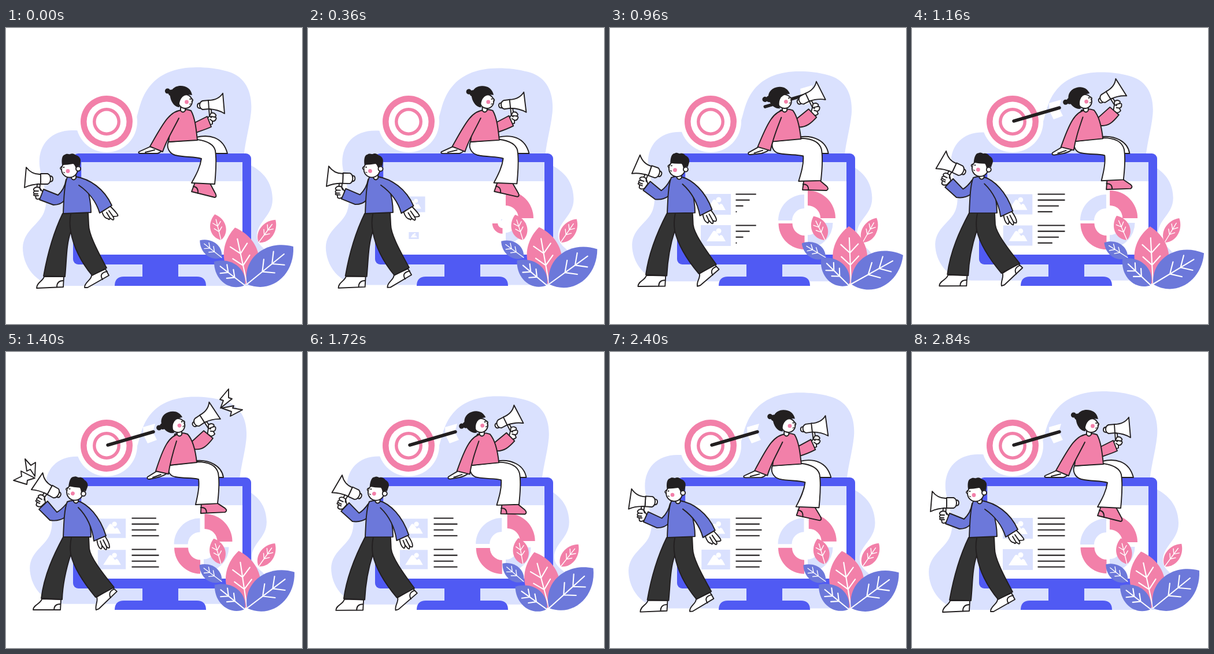
An HTML page for the animation above (2.88 s loop, 512 by 512 pixels).

```html
<!DOCTYPE html>
<html lang="en">
<head>
<meta charset="utf-8">
<title>Marketing team</title>
<style>
  html, body { margin: 0; width: 100%; height: 100%; overflow: hidden; background: #fff; }
  svg { display: block; width: 100vw; height: 100vh; }
  .ink { stroke: #221f20; stroke-width: 1.9; stroke-linejoin: round; stroke-linecap: round; }
  .vein { fill: none; stroke: #fff; stroke-linecap: round; }
</style>
</head>
<body>
<svg id="stage" viewBox="0 0 512 512"></svg>
<script>
const LOOP = 2880;
const PALE = '#dae1fe', PINK = '#f280a9', BLUE = '#505af3', SOFT = '#6c78da', INK = '#221f20', WHITE = '#fff';
const stage = document.getElementById('stage');

function add(tag, attrs, parent = stage) {
  const el = document.createElementNS('http://www.w3.org/2000/svg', tag);
  for (const k in attrs) el.setAttribute(k, attrs[k]);
  parent.appendChild(el);
  return el;
}
const group = (parent) => add('g', {}, parent);
const path = (d, fill, parent) => add('path', { d, fill }, parent);
const line = (d, fill, parent) => add('path', { d, fill, class: 'ink' }, parent);
const dot = (cx, cy, r, fill, parent) => add('circle', { cx, cy, r, fill }, parent);
const box = (x, y, width, height, fill, rx = 0, parent) => add('rect', { x, y, width, height, fill, rx }, parent);
const move = (el, value) => el.setAttribute('transform', value);
const grow = (x, y, s) => `translate(${x} ${y}) scale(${s}) translate(${-x} ${-y})`;

// Eased value through [time, value] points.
function key(t, pts) {
  if (t <= pts[0][0]) return pts[0][1];
  for (let i = 1; i < pts.length; i++) {
    const [t0, a] = pts[i - 1], [t1, b] = pts[i];
    if (t < t1) return a + (b - a) * (1 - Math.cos(Math.PI * (t - t0) / (t1 - t0))) / 2;
  }
  return pts[pts.length - 1][1];
}

// Outlined shape blending between two poses; `drive` names the motion it follows.
const morphs = [];
function morph(drive, fill, from, to, parent) {
  const end = to.match(/-?[\d.]+/g).map(Number);
  const el = line(from, fill, parent);
  morphs.push((pose) => {
    let i = 0;
    el.setAttribute('d', from.replace(/-?[\d.]+/g, (n) => (+n + (end[i++] - n) * pose[drive]).toFixed(2)));
  });
}

// Backdrop
const blob = path('M330 68 C275 68 248 93 236 122 C224 150 226 190 190 186 C155 182 140 177 115 177 ' +
  'C75 177 55 205 58 238 C61 265 76 290 66 318 C58 340 30 350 29 380 C29 410 50 446 95 446 L430 446 ' +
  'C450 440 468 420 463 402 C457 384 434 380 434 360 C434 335 462 325 461 295 C460 262 440 243 411 232 ' +
  'C411 205 421 175 424 145 C427 108 412 82 381 74.5 C365 70 347 68 330 68 Z', PALE);

[[53, WHITE], [45, PINK], [34.5, WHITE], [24, PINK], [18.5, WHITE]].forEach(([r, c]) => dot(174, 162, r, c));

const arrow = group();
path('M237 130 L258 124 L254 138 L261 152 L245 158 L238 144 Z', WHITE, arrow);
add('path', { d: 'M176 161 L255 138', stroke: INK, 'stroke-width': 5.5, 'stroke-linecap': 'round' }, arrow);

// Monitor
box(116, 217, 308, 192, BLUE, 9);
box(130.5, 232, 278.5, 160, WHITE);
box(130.5, 232, 278.5, 33, PALE);
box(236, 405, 62, 28, BLUE);
path('M188 446 Q188 430 204 430 L330 430 Q346 430 346 446 Z', BLUE);

const thumbs = [287, 341].map((y) => {
  const g = group();
  box(157, y, 52, 36, PALE, 0, g);
  dot(188, y + 10, 4.5, WHITE, g);
  path(`M167 ${y + 28} L178 ${y + 11} Q181 ${y + 8} 184 ${y + 12} L189 ${y + 19} Q192 ${y + 15} 195 ${y + 19} L200 ${y + 28} Z`, WHITE, g);
  return { g, y: y + 18 };
});

const rows = [];
[287, 341].forEach((top) => {
  for (let i = 0; i < 4; i++) {
    rows.push({ i, el: add('path', { stroke: INK, 'stroke-width': 2.1 }), y: top + i * 10.1 + 0.5 });
  }
});
const rowSway = [
  [[1200, 47], [1690, 34], [2200, 43], [2600, 47]],
  [[1420, 47], [2050, 34], [2700, 47]]
];

// Quarter ring centred on x, y, opening towards sx, sy and drifting by dx, dy.
function quarter(x, y, sx, sy, R, r, fill, dx, dy) {
  const f = sx * sy > 0 ? 1 : 0;
  const d = `M${x + sx * R} ${y} A${R} ${R} 0 0 ${f} ${x} ${y + sy * R} L${x} ${y + sy * r} A${r} ${r} 0 0 ${1 - f} ${x + sx * r} ${y} Z`;
  return { x, y, dx, dy, el: path(d, fill) };
}
const slices = [
  quarter(342, 329, 1, -1, 48, 22, PINK, 2.7, -2),
  quarter(342, 337, 1, 1, 43.5, 21, PALE, 0, 1),
  quarter(336.5, 338, -1, 1, 45, 21, PINK, -0.8, 1),
  quarter(336, 333, -1, -1, 45, 21, PALE, -0.8, -1)
];

// Woman
morph('w', WHITE, 'M329 189 C350 184 375 187 383 217 L345 217 L331 197 Z', 'M329 188 C350 186 373 196 376 217 L345 217 L331 197 Z');
morph('q', WHITE, 'M250 205 L230 214 Q228 217 233 217 L262 217 Q268 215 270 211 Z', 'M261 206 L245 216 Q243 220 248 220 L262 217 Q274 214 279 209 Z');
morph('q', 'none', 'M241 215 L257 211', 'M254 217 L268 212');
morph('w', PINK, 'M327 267 L321 283 L361 293 Q366 292 361 284 L353 269 Z', 'M338 262 L337 279 L379 277 Q384 274 379 270 L365 261 Z');
morph('w', 'none', 'M324 274 Q333 275 332 286', 'M337 269 Q347 268 347 278');
morph('w', WHITE, 'M281 197 C277 206 282 217 293 220 C310 224 325 222 338 226 C336 240 330 252 321 268 L361 270 C363 250 364 225 362 212 C359 200 345 195 331 193 Z',
  'M282 196 C278 206 284 215 293 216 C310 219 320 217 333 220 C335 234 331 250 328 264 L366 262 C368 245 370 225 367 209 C363 195 348 190 331 190 Z');

const horn = group();
line('M336 130 Q331 130 331 134.5 Q331 139 336 139 Z', WHITE, horn);
line('M351 125 L340 126 Q335 128 335 133.5 Q335 139 340 141 L351 140 Z', WHITE, horn);
line('M375 113 Q367 125 350 125 L351 140 Q367 141 378 148 Z', WHITE, horn);
line('M351 140 L352 152 L356 151 L355 141 Z', WHITE, horn);
line('M346 160 L352 152 L355 147 Q360 146 362 149 Q365 152 361 154 Q365 155 363 158 Q361 162 357 161 L357 166 Q353 168 349 166 Z', WHITE, horn);
line('M361 154 L355 153 M357 161 L353 158 M352 152 L355 155', 'none', horn);

morph('w', PINK, 'M324 165 L348 153 L355 171 C346 175 337 178 326 182', 'M318 158 L342 136 L358 149 C348 162 340 170 326 168');
morph('q', PINK, 'M300 143 C288 148 284 175 281 197 L331 194 C329 175 327 155 320 143 Q310 139 300 143 Z',
  'M292 142 C286 160 284 178 282 196 L330 191 C328 172 324 153 314 142 Q303 138 292 142 Z');
morph('q', PINK, 'M306 142 C285 142 274 160 249 205 L271 214 C277 195 287 180 299 156', 'M300 142 C282 144 272 165 259 206 L281 211 C284 190 288 176 295 154');
morph('q', WHITE, 'M302 136 L302 143 Q306 148 310 143 L310 136', 'M296 136 L296 143 Q300 148 304 143 L304 134');

const herHead = group();
const bun = group(herHead);
dot(279.5, 109, 4.6, INK, bun);
dot(286, 112, 5.5, INK, bun);
add('circle', { cx: 310, cy: 127, r: 12, fill: WHITE, class: 'ink' }, herHead);
line('M321 122 Q325 125 321.5 127', WHITE, herHead);
path('M322 116 C320 105 312 100 302 100 C290 100 283 109 284 119 C286 130 293 137 300 137 Q299 128 303 122 Q308 114 322 116 Z', INK, herHead);
dot(312.5, 128, 3.4, PINK, herHead);
dot(318.5, 123, 1.2, INK, herHead);
add('path', { d: 'M317 132 L320 131', stroke: INK, 'stroke-width': 1.2 }, herHead);

// Man
morph('w', WHITE, 'M66 430 C64 438 53 440 53 450 L99 448 L100 430 Z', 'M62 427 C60 436 47 437 47 446 L94 446 L95 428 Z');
morph('w', 'none', 'M99 437 Q88 437 88 448', 'M94 436 Q83 436 83 446');
morph('w', WHITE, 'M148 428 C148 436 135 440 136 449 L141 449 L178 428 L172 417 Z', 'M157 424 C160 431 154 437 156 446 L161 444 L192 414 L184 407 Z');
morph('w', 'none', 'M175 421 Q160 424 167 435', 'M187 410 Q176 415 181 425');
morph('w', '#333', 'M98 321 C84 350 72 390 65 429 L102 430 C105 400 104 375 112 352 C117 380 130 405 149 428 L174 415 C155 380 143 355 143 340 L142 319 Z',
  'M99 320 C83 350 66 385 61 426 L97 428 C98 400 104 375 112 350 C118 375 135 400 155 424 L187 407 C165 380 146 355 144 340 L143 319 Z');
morph('w', 'none', 'M112 352 Q109 336 112 322', 'M112 350 Q110 336 113 321');

const hisHorn = group();
line('M76 256 Q81 256 81 261 Q81 266 76 266 Z', WHITE, hisHorn);
line('M60 252 L72 252 Q77 254 77 261 Q77 268 72 270 L60 270 Z', WHITE, hisHorn);
line('M35 241 Q45 254 60 253 L60 270 Q44 270 32 276 Z', WHITE, hisHorn);
line('M54 270 L53 281 L58 282 L59 270 Z', WHITE, hisHorn);
line('M64 284 L58 276 Q52 274 49 277 Q46 280 50 282 Q46 284 49 287 Q46 290 51 290 L52 295 Q56 298 61 293 Z', WHITE, hisHorn);
line('M50 282 L56 282 M49 287 L55 287 M51 290 L56 290 M58 276 L60 281', 'none', hisHorn);

morph('q', SOFT, 'M104 262 C102 275 97 282 90 289 L65 279 L58 297 L82 306 C92 306 98 302 101 298', 'M104 263 C98 270 94 274 88 277 L72 258 L57 272 L76 291 C88 293 96 290 102 286');
morph('q', WHITE, 'M166 318 Q170 330 177 330 Q178 333 180 329 L185 332 Q188 331 185 326 Q191 326 193 325 Q196 324 180 308 Z',
  'M157 322 Q158 336 163 340 Q166 342 166 335 L171 341 Q175 344 174 337 Q179 341 179 337 Q179 330 170 317 Z');
morph('q', 'none', 'M180 329 L174 319 M185 326 L178 316', 'M166 335 L163 327 M174 337 L168 325');
morph('q', SOFT, 'M106 258 C101 270 100 295 99 321 L147 319 C147 300 143 285 140 275 L127 259 Q116 255 106 258 Z',
  'M106 259 C101 270 100 295 99 320 L147 320 C147 300 143 285 140 275 L127 259 Q116 255 106 259 Z');
morph('q', SOFT, 'M120 257 C145 261 170 278 183 307 L162 320 C156 300 142 283 126 272', 'M123 257 C142 263 162 284 173 318 L152 327 C149 303 140 284 125 269');
morph('q', WHITE, 'M113 254 L113 260 Q117 265 121 260 L121 252', 'M117 254 L117 259 Q121 264 125 259 L125 252');

const hisHead = group();
add('circle', { cx: 110, cy: 244.5, r: 14, fill: WHITE, class: 'ink' }, hisHead);
add('circle', { cx: 125, cy: 243.5, r: 4, fill: WHITE, class: 'ink' }, hisHead);
line('M96 240 Q92 243 96 245', WHITE, hisHead);
path('M97 237 C96 230 96 220 102 219 C105 216 109 219 111 218 C115 216 119 218 121 220 C126 221 130 226 129 231 L128 239 Q123 237 121 243 Q118 235 116 235 Q106 237 97 237 Z', INK, hisHead);
dot(107, 247.5, 3.4, PINK, hisHead);
dot(100, 241, 1.2, INK, hisHead);
add('path', { d: 'M99 249.5 L102 250.5', stroke: INK, 'stroke-width': 1.2 }, hisHead);

// Shouts
const shouts = [
  [54, 223, 'M33 185 L36 206 L42 203 L50 215 L51 191 L43 196 Z M13 222 L36 229 L37 222 L50 218 L26 206 L27 215 Z'],
  [361, 101, 'M385 64 L370 82 L376 84 L371 97 L391 81 L385 79 Z M373 97 L390 103 L388 111 L409 100 L392 97 L394 93 Z']
].map(([x, y, d]) => ({ x, y, el: line(d, WHITE) }));

// Plants
function leaf(x, y, angle, len, half, fill, gain, lag = 0) {
  const g = group(), c = half * 1.33;
  path(`M0 0 C${-c} ${-len * 0.2} ${-c} ${-len * 0.72} 0 ${-len} C${c} ${-len * 0.72} ${c} ${-len * 0.2} 0 0 Z`, fill, g);
  let d = `M0 0 L0 ${-len * 0.8}`;
  [0.33, 0.54].forEach((h) => {
    const w = half * 0.5, top = -len * (h + 0.15);
    d += ` M${-w} ${top} L0 ${-len * h} L${w} ${top}`;
  });
  add('path', { d, class: 'vein', 'stroke-width': len > 60 ? 2.1 : 1.4 }, g);
  return { g, x, y, angle, gain, lag };
}
const leaves = [
  leaf(372, 367, -13.7, 46, 13.5, PINK, -1.2),
  leaf(437, 371, 36.6, 49, 12.5, PINK, -0.7),
  leaf(373, 397, -51.7, 48, 13, SOFT, -0.75),
  leaf(417, 443, -12.1, 100, 30, PINK, 1, 70),
  leaf(417, 443, 50.9, 103, 30, SOFT, 1),
  leaf(413, 445, -52.3, 67, 19, SOFT, 0.7)
];
const sway = [[0, 0], [960, 10], [1720, -3], [2280, 3], [2720, 0]];

function draw(t) {
  const p = key(t, [[0, 0], [LOOP / 2, 1], [LOOP, 0]]);
  const q = p ** 1.5;
  const w = key(t, [[0, 0], [1320, 1], [LOOP, 0]]) ** 1.5;
  const pose = { q, w };
  morphs.forEach((m) => m(pose));

  move(blob, grow(264, 250, 1 - 0.052 * p));
  move(herHead, `translate(${-13.5 * q} ${1.5 * q}) rotate(${-19 * q} 306 124)`);
  move(bun, `rotate(${-27 * q} 302 118)`);
  move(hisHead, `translate(${9 * q} ${-2 * q}) rotate(${14 * q} 110 245)`);
  move(horn, `translate(${-15.5 * w} ${-29.5 * w}) rotate(${-29 * w} 376.5 130.5)`);
  move(hisHorn, `translate(${20.5 * p * p} ${-35 * q}) rotate(${29 * q} 33.5 258)`);

  const fly = Math.max(0, Math.min(186, (1080 - t) * 0.775));
  move(arrow, `translate(${fly} ${-0.27 * fly})`);
  arrow.setAttribute('opacity', t < 840 ? 0 : 1);

  const pulse = key(t, [[940, 0], [1480, 1], [2160, 1], [2760, 0]]);
  thumbs.forEach(({ g, y }, i) => {
    const s = key(t, [[120 + i * 100, 0], [480 + i * 100, 1]]);
    move(g, grow(183, y, s * (1 - 0.075 * pulse)));
  });
  const spread = key(t, [[1060, 0], [1700, 1], [2160, 1], [2760, 0]]);
  slices.forEach(({ x, y, dx, dy, el }, i) => {
    const s = key(t, [[80 + i * 80, 0], [360 + i * 80, 1]]);
    move(el, `translate(${dx * spread} ${dy * spread}) ${grow(x, y, s)}`);
  });
  rows.forEach(({ el, i, y }) => {
    const len = Math.max(0, Math.min((t - 660 - i * 95) * 0.117, key(t, rowSway[i % 2])));
    el.setAttribute('d', len ? `M217.5 ${y} h${len}` : '');
  });

  const burst = key(t, [[1160, 0], [1300, 1], [1560, 1], [1690, 0]]);
  shouts.forEach(({ el, x, y }) => {
    el.setAttribute('visibility', burst ? 'visible' : 'hidden');
    move(el, grow(x, y, burst));
  });

  leaves.forEach(({ g, x, y, angle, gain, lag }) =>
    move(g, `translate(${x} ${y}) rotate(${angle + gain * key(t - lag, sway)})`));
}

const start = performance.now();
function tick() {
  draw((performance.now() - start) % LOOP);
  requestAnimationFrame(tick);
}
draw(0);
requestAnimationFrame(tick);
</script>
</body>
</html>
```
